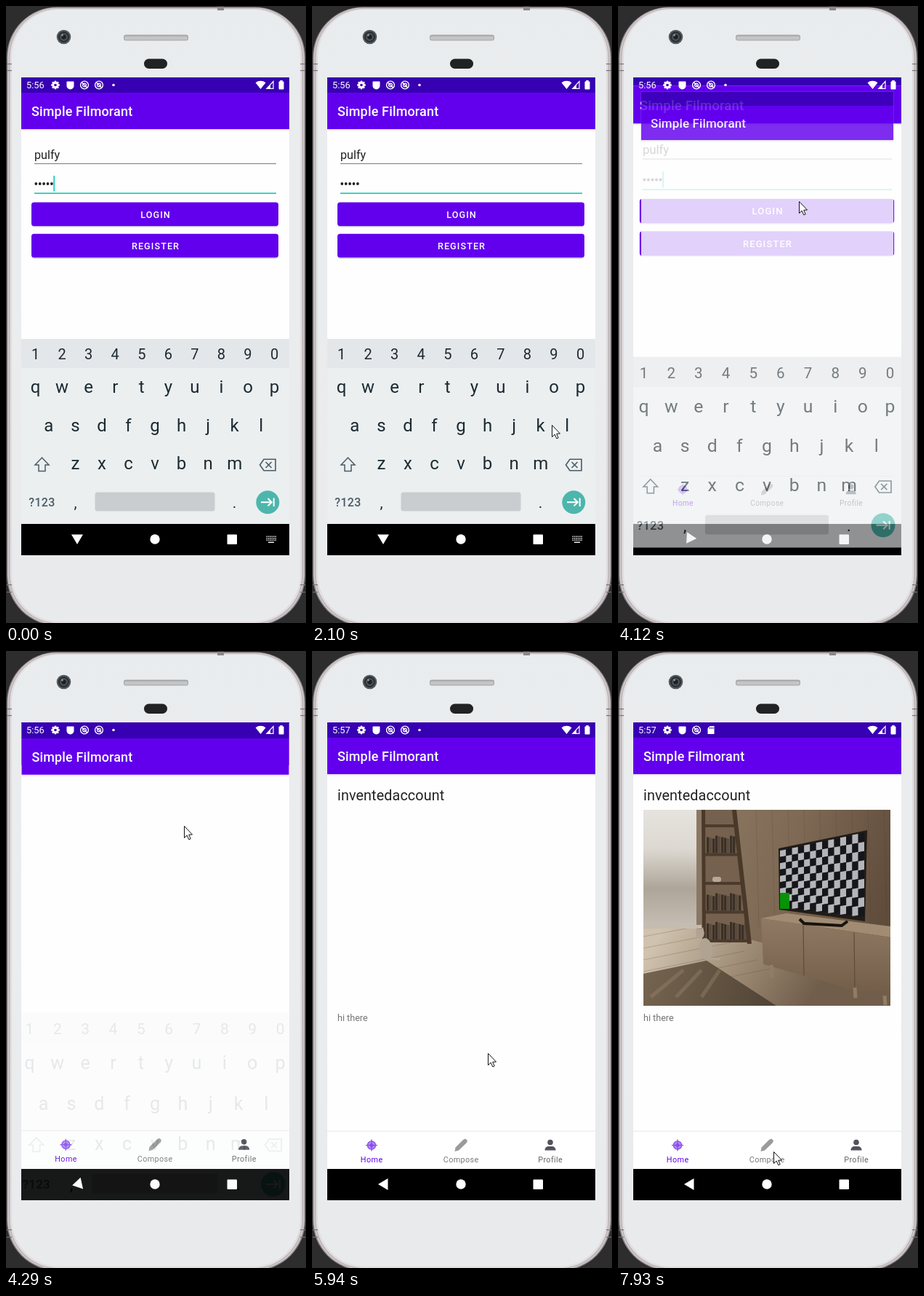
Recreate the animation shown at these times as an HTML page with a canvas. Size 413x847 px, loop 8 s.

```html
<!DOCTYPE html>
<html lang="en">
<head>
<meta charset="utf-8">
<style>
html, body { margin: 0; width: 100%; height: 100%; overflow: hidden; background: #2d2d2d; }
canvas { display: block; width: 413px; height: 847px; }
</style>
</head>
<body>
<canvas id="stage"></canvas>
<script>
const W = 413, H = 847, LOOP = 8000;
const canvas = document.getElementById('stage');
const layer = document.createElement('canvas');
const dpr = window.devicePixelRatio || 1;
for (const v of [canvas, layer]) {
  v.width = W * dpr;
  v.height = H * dpr;
}
let c = canvas.getContext('2d');
const PURPLE = '#6200ee', BAR = '#3700b3', TEAL = '#1fcfbb', INK = '#1c2a31', GREY = '#4b5c65';
const FONT = 'Roboto, sans-serif';

// pointer glides: start, end, x, y
const START = [272, 669];
const moves = [
  [150, 930, 180, 288], [1400, 2090, 330, 575], [2100, 2260, 371, 553], [2580, 3430, 250, 274],
  [4060, 4285, 245, 240], [4360, 4820, 241, 607], [4900, 5060, 241, 623], [5310, 5610, 242, 552],
  [6400, 6900, 124, 670], [6900, 7170, 175, 678], [7250, 7480, 205, 686], [7900, 7930, 214, 687]
];

const clamp = v => Math.max(0, Math.min(1, v));
const smooth = v => v * v * (3 - 2 * v);

function pointer(t) {
  let [x, y] = START;
  for (const [a, b, toX, toY] of moves) {
    const k = smooth(clamp((t - a) / (b - a)));
    x += (toX - x) * k;
    y += (toY - y) * k;
  }
  return [Math.round(x), Math.round(y)];
}

function box(x, y, w, h, color, r = 0) {
  c.fillStyle = color;
  c.beginPath();
  c.roundRect(x, y, w, h, r);
  c.fill();
}
function disc(x, y, r, color) {
  c.fillStyle = color;
  c.beginPath();
  c.arc(x, y, r, 0, 7);
  c.fill();
}
function ring(x, y, r, color, w) {
  c.strokeStyle = color;
  c.lineWidth = w;
  c.beginPath();
  c.arc(x, y, r, 0, 7);
  c.stroke();
}
function trace(pts) {
  c.beginPath();
  for (let i = 0; i < pts.length; i += 2) c.lineTo(pts[i], pts[i + 1]);
}
function poly(color, ...pts) {
  c.fillStyle = color;
  trace(pts);
  c.fill();
}
function line(color, w, ...pts) {
  c.strokeStyle = color;
  c.lineWidth = w;
  trace(pts);
  c.stroke();
}
function outline(color, w, ...pts) {
  c.strokeStyle = color;
  c.lineWidth = w;
  trace(pts);
  c.closePath();
  c.stroke();
}
function text(s, x, y, size, color, align = 'left', weight = 400, gap = 0) {
  c.font = `${weight} ${size}px ${FONT}`;
  c.letterSpacing = gap + 'px';
  c.textAlign = align;
  c.fillStyle = color;
  c.fillText(s, x, y);
}
function fade(x0, y0, x1, y1, ...colors) {
  const g = c.createLinearGradient(x0, y0, x1, y1);
  colors.forEach((v, i) => g.addColorStop(i / (colors.length - 1), v));
  return g;
}
// draws a scaled scene as one translucent sheet
function sheet(scale, y, drop, alpha, draw) {
  const main = c;
  c = layer.getContext('2d');
  c.setTransform(1, 0, 0, 1, 0, 0);
  c.clearRect(0, 0, layer.width, layer.height);
  c.scale(dpr, dpr);
  c.translate(205.5, y + drop);
  c.scale(scale, scale);
  c.translate(-205.5, -y);
  draw();
  c = main;
  c.globalAlpha = alpha;
  c.drawImage(layer, 0, 0, W, H);
  c.globalAlpha = 1;
}

function phone() {
  box(0, 0, W, H, '#2d2d2d');
  ['#8e898b', '#d3cdcf', '#b9b3b6', '#e2dddf'].forEach((color, i) =>
    box(1 + i * 1.5, 1.5 + i * 0.8, 411 - i * 3, 849 - i * 2, color, 69 - i));
  box(8, 5, 397, 840, fade(0, 0, 0, H, '#e9ecee', '#ebecee', '#e8eaec'), 65);
  for (const y of [79, 88, 794, 804])
    for (const x of [1, 405]) box(x, y, 7, 1.2, '#77727a');
  box(291, 1, 9, 5, '#8b8689');
  ['#54585b', '#2b2e31', '#49545d', '#1d2126'].forEach((color, i) => disc(79.5, 42.5, 9.8 - i * 2.2, color));
  disc(77.5, 40, 1.4, '#8c979d');
  box(162, 39.5, 89, 8, '#a4a6a8', 3);
  box(163, 41.5, 87, 5, '#c3c5c7', 2);
  box(190, 72.5, 32, 13.5, '#202223', 6.7);
}

function swirl(x) {
  ring(x, 108.5, 5.4, '#fff', 1.4);
  ring(x, 108.5, 2.4, '#fff', 1.2);
  line('#fff', 1.3, x - 3.5, 105, x + 4, 112.5);
}
function statusIcons(t) {
  text(t < 5310 ? '5:56' : '5:57', 28, 113, 12.8, '#fff');
  for (let a = 0; a < 3; a += Math.PI / 4) {
    const x = Math.cos(a) * 5.8, y = Math.sin(a) * 5.8;
    line('#fff', 2.6, 68 - x, 108.5 - y, 68 + x, 108.5 + y);
  }
  ring(68, 108.5, 3.2, '#fff', 2.6);
  disc(68, 108.5, 1.8, BAR);
  box(83.5, 103.5, 10, 11, '#fff', [1, 1, 5, 5]);
  swirl(108);
  if (t < 6000) {
    swirl(128);
    disc(148, 108.5, 1.8, '#fff');
  } else {
    poly('#fff', 126.5, 103, 132.5, 103, 132.5, 114, 123.5, 114, 123.5, 106);
    for (let i = 0; i < 3; i++) box(126 + i * 2.2, 104.5, 1, 2.5, BAR);
  }
  c.fillStyle = '#fff';
  c.beginPath();
  c.moveTo(350.5, 114);
  c.arc(350.5, 114, 11.3, -2.24, -0.9);
  c.fill();
  outline('#fff', 1.2, 368, 103.5, 368, 113.3, 358.8, 113.3);
  poly('#fff', 364, 108, 364, 113.5, 358.8, 113.5);
  box(375.5, 103.5, 7, 11, '#fff', 1);
  box(377.3, 102, 3.4, 2, '#fff');
}
function appFrame() {
  box(21, 98, 369, 613, '#fefefe');
  box(21, 169, 369, 3, fade(0, 169, 0, 172, '#dedce2', '#fefefe'));
  box(21, 98, 369, 21, BAR);
  box(21, 119, 369, 50, PURPLE);
  text('Simple Filmorant', 35, 151, 18, '#fff', 'left', 500, 0.15);
}
function button(y, label) {
  box(35.5, y + 1, 339, 33, '#cfc6dc', 4);
  box(35, y, 340, 32.5, PURPLE, 3.5);
  text(label, 206, y + 21, 12.6, '#fff', 'center', 500, 1.1);
}
function login(t) {
  appFrame();
  text('pulfy', 39, 210, 16.2, '#222');
  box(39, 216, 333, 1, '#7b7b7b');
  for (let i = 0; i < 5; i++) disc(41.3 + i * 5.4, 244, 1.9, '#222');
  const blink = Math.floor((t + 410) / 500) % 2 === 0;
  if (blink || t > 2580) box(65.3, 233, 1.8, 21.5, TEAL);
  box(39, 256.3, 333, 1.8, TEAL);
  button(269.5, 'LOGIN');
  button(312.7, 'REGISTER');
  const k = (t - 1290) / 510;
  if (k < 0 || k > 1) return;
  c.save();
  c.beginPath();
  c.roundRect(35, 269.5, 340, 32.5, 3.5);
  c.clip();
  disc(180, 288, 30 + 420 * k, `rgba(255,255,255,${0.24 * (1 - k)})`);
  c.restore();
}

function keyboard() {
  box(21, 457, 369, 254, '#ebeff0');
  box(21, 457, 369, 40, '#e4e7ea');
  ['1234567890', 'qwertyuiop', 'asdfghjkl', 'zxcvbnm'].forEach((row, r) => {
    const x = 205 - (row.length - 1) * 18.27, y = r ? 478.5 + r * 52.5 : 485;
    [...row].forEach((s, i) => text(s, x + i * 36.55, y, r ? 24 : 20, INK, 'center'));
  });
  outline(GREY, 1.5, 49.5, 620, 59, 630, 54, 630, 54, 638.5, 45, 638.5, 45, 630, 40, 630);
  outline(GREY, 1.6, 349.5, 630, 355, 622.2, 371, 622.2, 371, 637.8, 355, 637.8);
  for (const d of [-4, 4]) line(GREY, 1.6, 361.5 - d, 626, 361.5 + d, 634);
  text('?123', 49.5, 687, 16, GREY, 'center', 500, 0.3);
  text(',', 95.5, 689, 21, INK, 'center');
  text('.', 314.5, 689, 21, INK, 'center');
  box(122.5, 667.5, 165, 26, '#c9cdcf', 3);
  disc(360.3, 681.2, 16, '#4db6ac');
  line('#fff', 2, 351, 681.2, 365, 681.2);
  line('#fff', 2, 360.5, 676, 365.8, 681.2, 360.5, 686.4);
  line('#fff', 2, 368.7, 675.5, 368.7, 687);
}
function navBar(turn) {
  box(21, 711, 369, 43, '#000');
  c.save();
  c.translate(98, 732);
  c.rotate(turn * Math.PI / 2);
  poly('#fff', -8, -6.5, 8, -6.5, 0, 7);
  c.restore();
  disc(205, 732, 6.7, '#fff');
  box(304.5, 725.5, 13.5, 13.5, '#fff', 1);
  if (turn) return;
  for (let i = 0; i < 18; i++) box(358.5 + i % 6 * 2.4, 727.5 + Math.floor(i / 6) * 2.5, 1.4, 1.5, '#eee');
  box(361, 735.5, 8, 1.5, '#eee');
}

function shelf() {
  poly('#75614d', 118, 218, 160, 218, 180, 398, 118, 398);
  for (let i = 0; i < 5; i++) {
    const y = 238 + i * 39.5, right = 158 + i * 4.6;
    for (let x = 122; i && i !== 2 && x < right - 2; x += 4)
      box(x, y - 20 - x % 5, 3.4, 20 + x % 5, x % 3 ? '#3a3028' : '#5b4a3b');
    box(117, y, right - 115, 4, '#4c3b2c');
  }
  box(130, 310, 12, 7, '#b8a996', 3);
  line('#4a3929', 5, 117.5, 218, 118.5, 402);
  line('#4a3929', 6, 160, 218, 181, 402);
}
function television() {
  line('#16130f', 4, 250, 368, 256, 374, 308, 377, 316, 371);
  poly('#211c18', 221, 271, 343, 246, 340, 371, 222, 355);
  const cols = 14, rows = 9, w = 116 / cols;
  for (let i = 0; i < cols; i++) {
    const x = 223 + i * w, top = 274 - 25 * i / cols, h = (78 + 39 * i / cols) / rows;
    for (let j = 0; j < rows; j++) {
      const y = top + j * h;
      poly((i + j) % 2 ? '#15161b' : '#b4b5b9', x, y, x + w, y - 1.5, x + w, y + h - 1.3, x, y + h);
    }
  }
  box(223, 332, 13, 22, '#079207');
}
function room() {
  c.save();
  c.beginPath();
  c.rect(35, 218, 340, 269);
  c.clip();
  box(35, 218, 340, 269, fade(100, 240, 375, 330, '#8c7863', '#7d6954', '#604c3b'));
  for (let x = 190; x < 375; x += 22) line('rgba(60,45,32,.14)', 1, x, 218, x + 4, 380);
  poly(fade(70, 370, 260, 487, '#cfc2ae', '#9f8d77', '#705d4a'), 35, 376, 118, 380, 197, 400, 375, 450, 375, 487, 35, 487);
  for (let i = 0; i < 6; i++) line('rgba(85,68,50,.25)', 1, 35, 392 + i * 16, 120 + i * 18, 376 + i * 12);
  box(35, 218, 74, 162, fade(0, 218, 0, 380, '#e6e3de', '#dcd8d1', '#aea599', '#c6bfb5'));
  box(108, 218, 10, 164, '#8a7866');
  box(35, 376, 80, 5, '#c6bcae');
  shelf();
  poly(fade(35, 440, 215, 487, '#75644f', '#514435'), 35, 443, 122, 425, 218, 487, 35, 487);
  for (let i = 0; i < 3; i++) line('rgba(165,147,124,.3)', 5, 45 + i * 35, 475, 90 + i * 25, 438);
  // cat
  c.fillStyle = '#b0a392';
  c.beginPath();
  c.ellipse(121, 409, 9, 15, -0.15, 0, 7);
  c.ellipse(113, 389, 5.5, 6, 0, 0, 7);
  c.fill();
  poly('#b0a392', 107, 387, 109, 379, 113, 384, 117, 379, 119, 388);
  line('#b0a392', 3, 124, 422, 141, 423);
  // cabinet
  poly('#a18b72', 197, 367, 232, 360, 375, 378, 375, 393);
  poly(fade(0, 370, 0, 465, '#8f7963', '#745f4b'), 197, 367, 375, 393, 375, 467, 330, 467, 200, 430);
  for (const x of [255, 325]) line('#5e4b39', 1.2, x, x / 7 + 340, x + 1, x * 0.28 + 374);
  for (const x of [211, 326, 367]) line('#927c64', 5, x, 374 + x * 0.27, x + 1, 398 + x * 0.24);
  television();
  c.restore();
}
function home(t) {
  appFrame();
  if (t >= 5780) {
    text('inventedaccount', 35, 205, 19.8, '#222', 'left', 400, 0.1);
    text('hi there', 35, 508, 12.6, '#757575');
  }
  if (t >= 6080) room();
  box(21, 658.5, 369, 1.5, '#eeeeef');
  box(21, 660, 369, 51, '#fff');
  disc(82, 678.5, 5.8, '#b08cf5');
  ring(82, 678.5, 5.6, '#8a4dec', 1.3);
  line('#8a4dec', 1.3, 82, 670.5, 82, 686.5);
  line('#8a4dec', 1.3, 74, 678.5, 90, 678.5);
  disc(82, 678.5, 2.5, '#8a4dec');
  poly('#9b9b9b', 196.5, 687, 197.5, 681.5, 208, 671, 211, 669.5, 214, 672, 213, 675, 202, 685.5);
  disc(328, 674.5, 3.8, '#55525c');
  box(320.5, 680, 15, 5.6, '#55525c', [5, 5, 0, 0]);
  [['Home', PURPLE], ['Compose', '#77757b'], ['Profile', '#66646a']].forEach(([label, color], i) =>
    text(label, 82.2 + i * 123, 702, 10.8, color, 'center', 400, 0.4));
}

function arrow(x, y) {
  c.save();
  c.translate(x + 0.5, y + 0.5);
  const pts = [0, 0, 0, 16, 3.7, 12.6, 6.3, 18.3, 8.7, 17.3, 6.2, 11.7, 11, 11.5];
  poly('#fff', ...pts);
  outline('#111', 1, ...pts);
  c.restore();
}

function draw(t) {
  const p = t < 4060 ? 0 : clamp((t - 3990) / 350);
  const ease = 1 - (1 - p) ** 2;
  c.setTransform(dpr, 0, 0, dpr, 0, 0);
  phone();
  c.save();
  c.beginPath();
  c.rect(21, 98, 369, 656);
  c.clip();
  if (p < 1) sheet(1 + 0.05 * ease, 426, 0, 1, () => login(t));
  if (p > 0) sheet(0.85 + 0.15 * ease, 426, 0, clamp(p * 2.2), () => home(t));
  statusIcons(t);
  navBar(p);
  if (p < 0.95) sheet(1 + 0.05 * ease, 584, 47 * ease, clamp(1 - p * 1.05), keyboard);
  c.restore();
  if (t >= 150) arrow(...pointer(t));
}

const start = performance.now();
function tick() {
  draw((performance.now() - start) % LOOP);
  requestAnimationFrame(tick);
}
tick();
</script>
</body>
</html>
```
